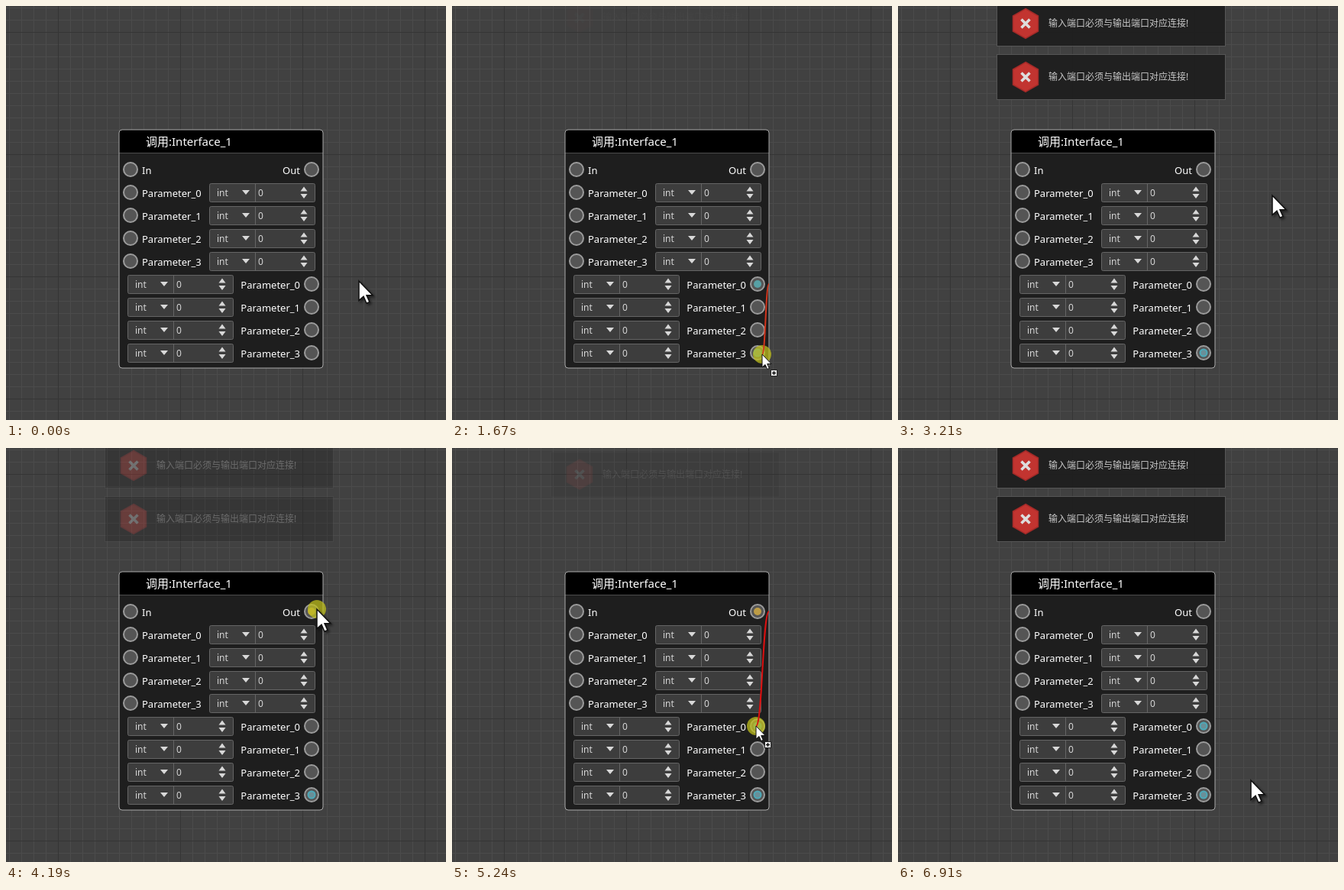
These frames come from a looping animation (576 px wide and 542 px high, 7.17 s). An HTML page:

```html
<!DOCTYPE html>
<html lang="zh-CN">
<head>
<meta charset="utf-8">
<title>Node ports</title>
<style>
  html, body { margin: 0; width: 100%; height: 100%; overflow: hidden; background: #414141; }
  svg { display: block; width: 576px; height: 542px; }
  text { font: 13px "Noto Sans", "Noto Sans CJK SC", sans-serif; fill: #fff; }
  .title { font-size: 15px; }
  .field text { font-size: 12px; fill: #d6d6d6; }
  .toast text { font-size: 12px; fill: #c9c9c9; }
  .port { fill: #555; stroke: #9b9b9b; stroke-width: 2; }
  .linked { fill: #6a8f98; stroke: #4ba9b8; stroke-width: 2; }
</style>
</head>
<body>
<svg viewBox="0 0 576 542">
  <defs>
    <pattern id="fine" x="4" y="2" width="16" height="16" patternUnits="userSpaceOnUse">
      <path d="M.5 0V16M0 .5H16" stroke="#4b4b4b"/>
    </pattern>
    <pattern id="coarse" x="68" y="34" width="160" height="160" patternUnits="userSpaceOnUse">
      <path d="M.5 0V160M0 .5H160" stroke="#353535"/>
    </pattern>
    <g id="field" class="field">
      <rect x="266.5" y="232.5" width="138" height="24" rx="2" fill="#3d3d3d" stroke="#656565"/>
      <path d="M326.500 233V256" stroke="#656565"/>
      <path d="M309 241h10l-5 6zM385.500 242.500h9l-4.500-6zM385.500 246h9l-4.500 6z" fill="#d8d8d8"/>
      <text x="276" y="249">int</text>
      <text x="330" y="249">0</text>
    </g>
    <g id="toast" class="toast">
      <rect x="129.500" y="63.500" width="299" height="59" fill="#1e1e1e" fill-opacity=".94" stroke="#565656"/>
      <path d="M167 73.500l16.500 9.500v20l-16.500 9.500-16.500-9.500v-20z" fill="#c23430" stroke="#a32a28" stroke-width="1.500"/>
      <path d="M161.500 87.500l11 11m0-11l-11 11" stroke="#ddd" stroke-width="3.600"/>
      <text x="197" y="97">输入端口必须与输出端口对应连接!</text>
    </g>
    <path id="pointer" d="M0 0V17L4 13.500 6.700 19.500 9.300 18.300 6.700 12.500H12Z" fill="#fff" stroke="#111"/>
    <filter id="shadow" x="-50%" y="-50%" width="200%" height="200%">
      <feDropShadow dx="1.500" dy="1.500" stdDeviation="1" flood-opacity=".5"/>
    </filter>
  </defs>

  <rect width="576" height="542" fill="#414141"/>
  <rect width="576" height="542" fill="url(#fine)"/>
  <rect width="576" height="542" fill="url(#coarse)"/>

  <rect x="148" y="162" width="267" height="312" rx="4" fill="#1e1e1e"/>
  <path d="M148 192V166q0-4 4-4h259q4 0 4 4v26z" fill="#000"/>
  <path d="M148 192.500H415" stroke="#4c4c4c"/>
  <rect x="148" y="162" width="267" height="312" rx="4" fill="none" stroke="#aaa"/>
  <text class="title" x="183" y="183">调用:Interface_1</text>
  <g id="rows"></g>

  <circle id="dotParam" cx="400" cy="364" r="5" fill="#57a0a5"/>
  <circle id="dotOut" cx="400" cy="214" r="5" fill="#bd9c46"/>
  <circle id="linkLast" class="linked" cx="400" cy="454" r="4.500"/>
  <circle id="linkFirst" class="linked" cx="400" cy="364" r="4.500"/>

  <g id="toasts">
    <use href="#toast"/>
    <use href="#toast" y="-70"/>
  </g>

  <circle id="press" r="12" fill="#c0c01c" fill-opacity=".74"/>
  <path id="wire" fill="none" stroke-width="2" pathLength="100"/>

  <g id="cursor">
    <use id="arrow" href="#pointer" transform="scale(1.5)" filter="url(#shadow)"/>
    <g id="accept">
      <use href="#pointer"/>
      <rect x="11.500" y="20.500" width="8" height="8" fill="#fff" stroke="#222"/>
      <path d="M13 24.500h5M15.500 22v5" stroke="#000" stroke-width="1.300"/>
    </g>
    <g id="deny" fill="none">
      <circle cx="9" cy="9" r="6" stroke="#ddd" stroke-width="4"/>
      <path d="M5 5l8 8" stroke="#ddd" stroke-width="4"/>
      <circle cx="9" cy="9" r="6" stroke="#111" stroke-width="2"/>
      <path d="M5 5l8 8" stroke="#111" stroke-width="2"/>
    </g>
  </g>
</svg>
<script>
const LOOP = 7170, FADE = 1000;
const $ = id => document.getElementById(id);

// Pointer path: time, x, y
const path = [
  [0, 462, 360], [70, 462, 360], [560, 404, 362], [760, 404, 360],
  [830, 415, 375], [970, 459, 421], [1180, 450, 438], [1530, 412, 449],
  [1600, 406, 456], [2160, 406, 456], [2300, 431, 440], [3070, 505, 311],
  [3210, 490, 248], [3630, 430, 215], [3910, 407, 211], [4190, 407, 211],
  [4610, 506, 305], [5100, 400, 364], [5240, 398, 364], [5800, 399, 364],
  [6150, 404, 358], [6350, 404, 358], [6910, 462, 435]
];

const drags = [
  { press: 700, move: 830, hover: 1600, drop: 2230, y: 364, color: '#50aeb4', hit: '#d2351c' },
  { press: 4050, move: 4260, hover: 5100, drop: 5740, y: 214, color: '#bd9c46', hit: '#dc1010' }
];
const notices = [{ start: 1660, end: 3490 }, { start: 5140, end: Infinity }];

const port = (x, y) => `<circle class="port" cx="${x}" cy="${y}" r="9"/>`;
const label = (x, y, text, anchor = 'start') =>
  `<text x="${x}" y="${y + 6}" text-anchor="${anchor}">${text}</text>`;

let rows = port(163, 214) + label(178, 214, 'In') + port(400, 214) + label(385, 214, 'Out', 'end');
for (let i = 0; i < 4; i++) {
  const y = 244 + i * 30, name = 'Parameter_' + i;
  rows += port(163, y) + label(178, y, name) + `<use href="#field" y="${i * 30}"/>`;
  rows += port(400, y + 120) + label(385, y + 120, name, 'end') +
    `<use href="#field" x="-107" y="${120 + i * 30}"/>`;
}
$('rows').innerHTML = rows;

const clamp = v => Math.max(0, Math.min(1, v));
const show = (id, on) => $(id).setAttribute('visibility', on ? 'visible' : 'hidden');

// The picture advances in steps of 70 ms, with a few longer holds
function tick(t) {
  const base = t < 760 ? 0 : t < 6420 ? 760 : 6420;
  return Math.min(base + Math.floor((t - base) / 70) * 70, 6910);
}

function pointAt(t) {
  const i = path.findIndex(p => p[0] >= t);
  if (i <= 0) return path[0].slice(1);
  const a = path[i - 1], b = path[i], k = (t - a[0]) / (b[0] - a[0]);
  return [a[1] + (b[1] - a[1]) * k, a[2] + (b[2] - a[2]) * k];
}

function drawToasts(t) {
  const n = notices.find(n => t >= n.start && t < n.end + FADE);
  show('toasts', n);
  if (!n) return;
  const p = clamp((t - n.start) / FADE);
  $('toasts').setAttribute('opacity', p * clamp(1 - (t - n.end) / FADE));
  $('toasts').setAttribute('transform', `translate(0 ${-80 * (1 - p) ** 3})`);
}

function draw(t) {
  const [x, y] = pointAt(t);
  const drag = drags.find(d => t >= d.press && t < d.drop);
  const moving = drag && t >= drag.move;
  const hit = drag && t >= drag.hover;

  $('cursor').setAttribute('transform', `translate(${x} ${y})`);
  show('arrow', !moving);
  show('accept', hit);
  show('deny', moving && !hit);

  $('press').setAttribute('cx', x);
  $('press').setAttribute('cy', y);
  show('press', drag);

  show('wire', moving);
  if (moving) {
    const mid = (415 + x) / 2;
    $('wire').setAttribute('d', `M415 ${drag.y}C${mid} ${drag.y} ${mid} ${y} ${x} ${y}`);
    $('wire').setAttribute('stroke', hit ? drag.hit : drag.color);
    $('wire').setAttribute('stroke-dasharray', hit ? '100 0' : '78 100');
  }

  show('dotParam', drag === drags[0]);
  show('dotOut', drag === drags[1]);
  show('linkLast', t >= drags[0].hover);
  show('linkFirst', t >= drags[1].hover);
  drawToasts(t);
}

const origin = performance.now();
function frame() {
  draw(tick((performance.now() - origin) % LOOP));
  requestAnimationFrame(frame);
}
frame();
</script>
</body>
</html>
```
